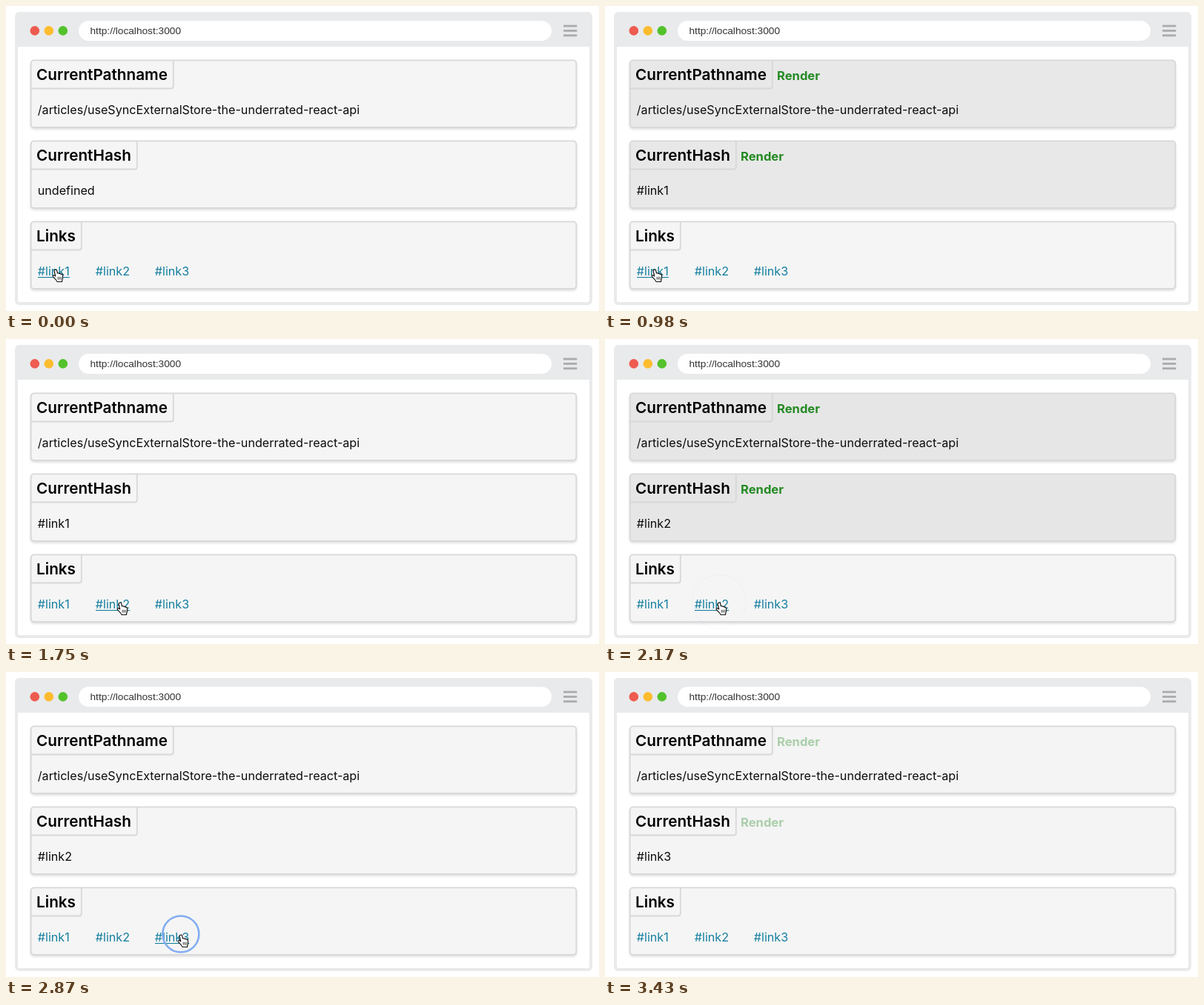
An HTML page for the animation above (3500 ms loop, 800x412 px).

```html
<!DOCTYPE html>
<html lang="en">
<head>
<meta charset="utf-8">
<title>Hash links</title>
<style>
  html, body { margin: 0; width: 100%; height: 100%; overflow: hidden; background: #fff; }
  svg { display: block; width: 800px; height: 412px; }
  text { font: 400 16.12px Inter, "Liberation Sans", sans-serif; fill: #0c0c0c; font-optical-sizing: none; }
  .url { font: 13.7px "Liberation Sans", sans-serif; fill: #333; }
  .title { font-weight: 600; font-size: 20.72px; fill: #000; }
  .render { font-weight: 700; font-size: 16.6px; fill: #248a24; }
  .link { fill: #167f9f; }
  .edge { fill: none; stroke: #d6d8da; stroke-width: 1.8; }
  .card { filter: drop-shadow(0 2px 1.5px rgba(0, 0, 0, .13)); }
</style>
</head>
<body>
<svg id="stage" viewBox="0 0 800 412"></svg>
<script>
const LOOP = 3500, STEP = 70, RING = 420;
const CLICKS = [560, 1820, 2800];
const LINK_X = [43, 121, 201];

const stage = document.getElementById("stage");

function add(tag, attrs, text = "", parent = stage) {
  const el = document.createElementNS("http://www.w3.org/2000/svg", tag);
  set(el, attrs);
  el.textContent = text;
  return parent.appendChild(el);
}

function set(el, attrs) {
  for (const key in attrs) el.setAttribute(key, attrs[key]);
}

const clamp = v => Math.min(1, Math.max(0, v));

// Smooth 0 to 1 from a start time.
function glide(t, start, span) {
  const p = clamp((t - start) / span);
  return p * p * (3 - 2 * p);
}

// Rises after 70 ms, holds, and falls to zero at the end time.
const pulse = (t, rise, fall, end) => clamp(Math.min((t - 70) / rise, (end - t) / fall));

const pointer = t => ({
  x: 67 + 87 * glide(t, 1190, 420) + 82 * glide(t, 2240, 420),
  y: 356 - glide(t, 2240, 420) + 59 * glide(t, 3080, 280)
});

// Browser window
add("rect", { x: 12, y: 8, width: 779, height: 396, rx: 6, fill: "#e9eaeb" });
add("path", { d: "M16 55H787V397q0 3-3 3H19q-3 0-3-3z", fill: "#fff" });
["#ee5b50", "#fdbc2e", "#53c22b"].forEach((fill, i) =>
  add("circle", { cx: 38.8 + 19 * i, cy: 33.4, r: 6.3, fill }));
add("rect", { x: 98, y: 20, width: 638, height: 27, rx: 13.5, fill: "#fff" });
add("text", { x: 113.5, y: 38.2, class: "url" }, "http://localhost:3000");
for (let i = 0; i < 3; i++)
  add("rect", { x: 752, y: 25.6 + 6.4 * i, width: 18.3, height: 2.8, fill: "#aaabac" });

function card(row, title, tabRight, body) {
  const y = 72.5 + 109 * row;
  const box = add("rect", { x: 33.7, y: y + .9, width: 735.6, height: 90.4, rx: 4, class: "edge card" });
  box.style.fill = "#f5f5f5";
  add("path", { d: `M34 ${y + 39}H${tabRight - 4}q3.3 0 3.3-3.3V${y + 1}`, class: "edge" });
  add("text", { x: 41, y: y + 27.8, class: "title" }, title);
  const label = add("text", { x: tabRight + 5.5, y: y + 27.5, class: "render", opacity: 0 }, "Render");
  const text = add("text", { x: 42.8, y: y + 73.4 }, body);
  return { box, label, text };
}

const path = card(0, "CurrentPathname", 226.5, "/articles/useSyncExternalStore-the-underrated-react-api");
const hash = card(1, "CurrentHash", 177.5, "undefined");
card(2, "Links", 102.5, "");

const links = LINK_X.map((x, i) => {
  const text = add("text", { x: x - .2, y: 364, class: "link" }, "#link" + (i + 1));
  const width = text.getComputedTextLength();
  return { x, width, line: add("rect", { x, y: 366, width, height: 1.1, class: "link" }) };
});

const ring = add("circle", { fill: "none", stroke: "#82adf0" });
const hand = add("g", { "stroke-linejoin": "round", "stroke-linecap": "round", stroke: "#111" });
add("path", {
  d: "M5 1.2C6.3.6 7 1.5 7.2 2.6L8 6C9 5.4 10 5.8 10.3 6.6 11.2 6 12.3 6.4 12.6 7.3 14 6.9 14.9 7.8 15 9V12C15 14 14 15 14 17.5H7.5C7 15 4 13 2 10.6.9 9.2 2.5 7.9 4 9L5.2 10 3.6 3C3.4 2 4 1.4 5 1.2Z",
  fill: "#fff", "stroke-width": 1.15
}, "", hand);
add("path", { d: "M8.7 11.2V14.2M10.7 11.2V14.2M12.7 11.2V14.2", fill: "none", "stroke-width": .8 }, "", hand);

function draw(t) {
  const { x, y } = pointer(t);
  set(hand, { transform: `translate(${x - 5.5} ${y - 1})` });
  for (const link of links) {
    const over = x >= link.x && x <= link.x + link.width && y < 370;
    set(link.line, { opacity: over ? 1 : 0 });
  }

  const click = CLICKS.filter(c => c <= t).pop() ?? LOOP;
  const since = t - click;
  const p = clamp(since / RING);
  const center = pointer(click);
  set(ring, {
    cx: center.x - .2,
    cy: center.y - 1,
    r: 37 - 18 * (1 - p) ** 2,
    "stroke-width": 3 - 2.4 * p,
    opacity: since < 0 ? 0 : clamp(2 - 2.3 * p)
  });

  const grey = Math.round(245 - 15 * pulse(since, 140, 260, 650));
  for (const c of [path, hash]) {
    c.box.style.fill = `rgb(${grey},${grey},${grey})`;
    set(c.label, { opacity: pulse(since, 200, 200, 700) });
  }
  const shown = CLICKS.filter(c => c + 140 <= t).length;
  hash.text.textContent = shown ? "#link" + shown : "undefined";
}

const start = performance.now();
function tick() {
  const t = (performance.now() - start) % LOOP;
  draw(Math.floor(t / STEP) * STEP);
  requestAnimationFrame(tick);
}
tick();
</script>
</body>
</html>
```
